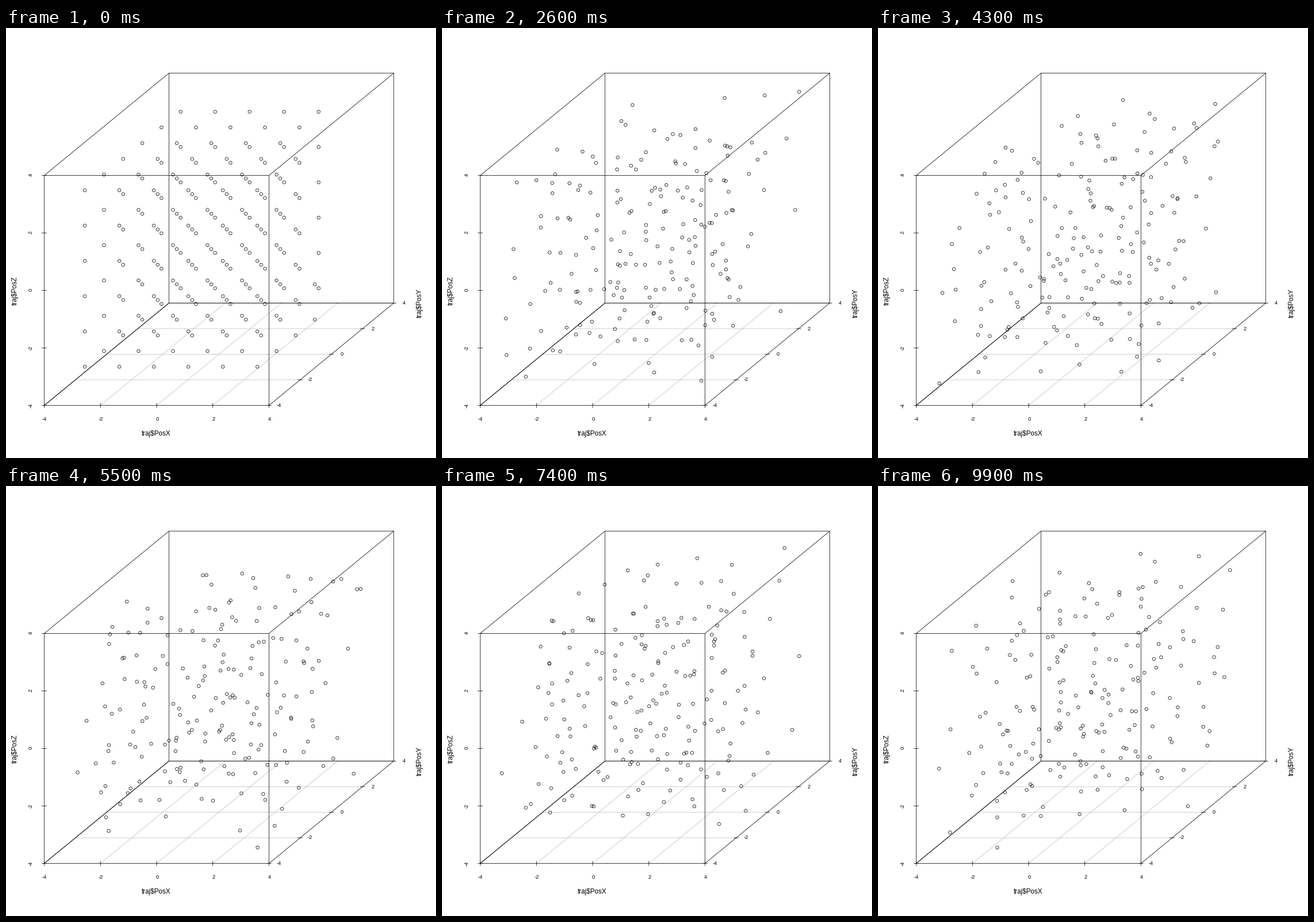
A matplotlib script that plays this animation: 748x748 px, repeating every 10 s.

```python
import numpy as np
import matplotlib.pyplot as plt
from matplotlib.animation import FuncAnimation

SIZE, DPI = 748, 100
FRAMES, INTERVAL = 100, 100
PT = 72 / DPI  # points per pixel
STROKE = 0.75 * PT

# Lennard-Jones fluid in a periodic box, reduced units
N, DENSITY, TEMP = 200, 0.5, 1.5
BOX = (N / DENSITY) ** (1 / 3)
CUTOFF, DT, SUBSTEPS = 2.5, 0.005, 5


def lattice():
    n = int(np.ceil(N ** (1 / 3)))
    cells = np.stack(np.meshgrid(*[np.arange(n)] * 3, indexing="ij"), -1)
    return ((cells.reshape(-1, 3)[:N] + 0.5) / n - 0.5) * BOX


def forces(pos):
    d = pos[:, None] - pos[None]
    d -= BOX * np.round(d / BOX)
    r2 = (d ** 2).sum(-1)
    np.fill_diagonal(r2, np.inf)
    inv2 = np.where(r2 < CUTOFF ** 2, 1 / r2, 0)
    inv6 = inv2 ** 3
    scale = 24 * inv2 * inv6 * (2 * inv6 - 1)
    return (d * scale[..., None]).sum(1)


def simulate():
    rng = np.random.default_rng(7)
    pos = lattice()
    vel = rng.normal(0, np.sqrt(TEMP), pos.shape)
    vel -= vel.mean(0)
    acc = forces(pos)
    path = [pos.copy()]
    for _ in range(FRAMES - 1):
        for _ in range(SUBSTEPS):
            vel += 0.5 * DT * acc
            pos += DT * vel
            pos -= BOX * np.round(pos / BOX)
            acc = forces(pos)
            vel += 0.5 * DT * acc
        path.append(pos.copy())
    return path


def project(x, y, z):
    """Oblique projection of data coordinates to stage pixels."""
    px = 66.5 + 48.875 * (x + 4) + 27.125 * (y + 4)
    py = 656.5 - 22.25 * (y + 4) - 50 * (z + 4)
    return px, py


fig = plt.figure(figsize=(SIZE / DPI, SIZE / DPI), dpi=DPI, facecolor="white")
ax = fig.add_axes([0, 0, 1, 1])
ax.set(xlim=(0, SIZE), ylim=(SIZE, 0))
ax.axis("off")


def line(xs, ys, color="black", z=2):
    ax.plot(xs, ys, color=color, lw=STROKE, zorder=z, snap=False,
            solid_capstyle="round")


def edge(a, b, **kw):
    line(*zip(project(*a), project(*b)), **kw)


def label(x, y, s, size, rot=0):
    ax.text(x, y, s, fontsize=size * PT, family="Liberation Sans",
            rotation=rot, ha="center", va="center", parse_math=False)


# Floor grid
for v in (-2, 0, 2):
    edge((v, -4, -4), (v, 4, -4), color="#bebebe", z=1)
    edge((-4, v, -4), (4, v, -4), color="#bebebe", z=1)

# Box edges; the two floor edges behind are stroked twice
for a in (-4, 4):
    for b in (-4, 4):
        edge((-4, a, b), (4, a, b))
        edge((a, -4, b), (a, 4, b))
        edge((a, b, -4), (a, b, 4))
edge((-4, -4, -4), (-4, 4, -4))
edge((-4, 4, -4), (4, 4, -4))

# Ticks and their labels
for v in range(-4, 5, 2):
    nudge = 1 if v >= 0 else 0
    x, y = project(v, -4, -4)
    line([x, x], [y - 4, y + 4])
    label(x + nudge, 680.5, str(v), 9.3)
    x, y = project(4, v, -4)
    line([x - 4, x + 4], [y, y])
    label(x + 17 + nudge, y, str(v), 9.3)
    x, y = project(-4, -4, v)
    line([x - 4, x + 4], [y, y])
    label(43, y - nudge, str(v), 9.3, 90)

label(261.5, 706.5, "traj$PosX", 11.6)
label(720, 478.5, "traj$PosY", 11.6, 90)
label(15.5, 456.5, "traj$PosZ", 11.6, 90)

path = simulate()
dots = ax.scatter(*project(*path[0].T), s=(5.4 * PT) ** 2, facecolors="none",
                  edgecolors="black", linewidths=STROKE, zorder=3, snap=False)


def draw(i):
    dots.set_offsets(np.column_stack(project(*path[i].T)))
    return (dots,)


anim = FuncAnimation(fig, draw, frames=FRAMES, interval=INTERVAL,
                     init_func=lambda: draw(0), repeat=True, repeat_delay=0)
plt.show()
```
